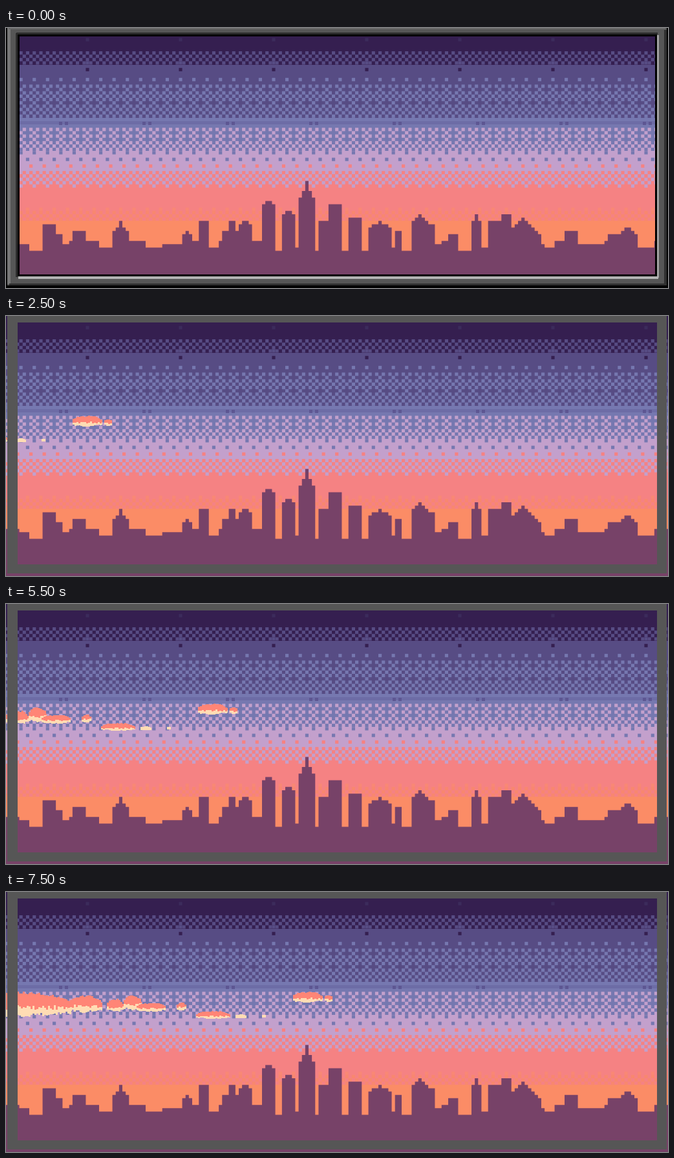
An HTML page with a canvas that plays this animation: 1024 px wide and 402 px high, repeating every 8000 ms.

```html
<!DOCTYPE html>
<html lang="en">
<head>
<meta charset="utf-8">
<title>City at dusk</title>
<style>
  html, body { margin: 0; width: 1024px; height: 402px; overflow: hidden; background: #565656; }
  canvas { display: block; }
</style>
</head>
<body>
<canvas id="stage" width="1024" height="402"></canvas>
<script>
const W = 1024, H = 402, CELL = 36 / 7, COLS = 200;
const NIGHT = '#351f50', DUSK = '#574c84', BLUE = '#7678b0', LILAC = '#c3a0cc';
const SALMON = '#f58283', ORANGE = '#fb8c66', CITY = '#774268';
const CORAL = '#ff8576', CREAM = '#ffdcb4', GREY = '#565656';

const ctx = document.getElementById('stage').getContext('2d');
const backdrop = document.createElement('canvas');
backdrop.width = W;
backdrop.height = H;
const sky = backdrop.getContext('2d');

function seeded(seed) {
  return () => (seed = (seed * 16807) % 2147483647) / 2147483647;
}

function box(g, color, x, y, x2, y2) {
  g.fillStyle = color;
  g.fillRect(x, y, x2 - x, y2 - y);
}

function band(color, row, end) {
  box(sky, color, 0, Math.round(row * CELL), W, Math.round(end * CELL));
}

// One row of single cells, every `gap` columns.
function dots(color, row, gap, first = 0) {
  sky.fillStyle = color;
  for (let c = first; c < COLS; c += gap) sky.fillRect(c * CELL, row * CELL, CELL, CELL);
}

// Checkerboard; rows listed in `sparse` keep every other dot.
function checker(color, row, end, parity, sparse = []) {
  for (let r = row; r < end; r++) {
    dots(color, r, sparse.includes(r) ? 4 : 2, (r + parity) % 2);
  }
}

function paintSky() {
  band(NIGHT, 0, 11);
  band(DUSK, 11, 27);
  band(BLUE, 27, 37);
  band(LILAC, 37, 44);
  band(SALMON, 44, 58);
  band(ORANGE, 58, 79);

  dots('#3c2c5c', 3, 28, 24);
  checker(DUSK, 7, 11, 1);
  dots(DUSK, 10, 28, 24);
  dots(NIGHT, 12, 28, 24);
  dots(BLUE, 15, 4);
  checker(BLUE, 17, 27, 0, [18, 22]);

  band('#6d6ca6', 28, 29);
  for (let x = 82; x < W; x += 129) {
    for (const dx of [0, 9]) box(sky, '#5d5692', x + dx, 145, x + dx + 5, 150);
  }

  checker(LILAC, 30, 37, 1, [31, 33]);
  dots(BLUE, 37, 4);
  dots(BLUE, 39, 4, 2);
  dots(SALMON, 41, 4, 3);
  dots(SALMON, 43, 2, 1);
  checker(LILAC, 44, 48, 1, [47]);

  dots('#f98875', 54, 4, 2);
  checker('#f8876f', 55, 58, 1);
}

// Landmarks in cells: x, width, top row, and how steeply the roof falls from its middle.
const towers = [
  [11, 4, 59], [15, 2, 62], [20, 4, 61], [32, 5, 58, 1.5], [53, 3, 61, 1], [58, 3, 58],
  [65, 5, 61], [67, 2, 58], [70, 4, 57, 1], [77, 4, 52, .6], [83, 4, 54.5, 1],
  [88, 5, 46, 2.5], [94, 7, 58], [97, 4, 53], [103, 4, 57], [109, 7, 58, .6],
  [117, 2, 61], [122, 5, 56, 1], [126, 3, 59], [133, 3, 62], [140, 3, 56, 2],
  [145, 7, 58], [149, 3, 56], [150, 11, 57, 1], [168, 4, 61], [181, 9, 62], [185, 4, 60, .6]
];

function paintCity() {
  const random = seeded(11);
  const roofs = [];
  while (roofs.length < COLS) {
    const top = 64 + Math.floor(random() * 4);
    for (let n = 2 + random() * 4; n > 0; n--) roofs.push(top);
  }
  for (const [x, width, top, slope = 0] of towers) {
    for (let i = 0; i < width; i++) {
      const row = Math.round(top + Math.abs(i - (width - 1) / 2) * slope);
      roofs[x + i] = Math.min(roofs[x + i], row);
    }
  }
  sky.beginPath();
  sky.moveTo(0, H);
  roofs.forEach((row, c) => {
    sky.lineTo(c * CELL, row * CELL);
    sky.lineTo((c + 1) * CELL, row * CELL);
  });
  sky.lineTo(W, H);
  sky.fillStyle = CITY;
  sky.fill();
}

// Puffs as x, width, top, bottom, placed where the drift ends.
const puffs = [
  [442, 46, 154, 172], [491, 12, 159, 171],
  [292, 53, 184, 197], [353, 17, 189, 196], [394, 6, 189, 195],
  [154, 26, 165, 187], [180, 28, 160, 184], [200, 45, 171, 186], [262, 15, 170, 184],
  [-90, 190, 154, 195], [94, 53, 160, 188]
];

// A ragged dome with a lit underside; thin wisps are lit throughout.
function drawPuff([x, width, top, bottom], random) {
  const height = bottom - top, step = 3;
  for (let dx = 0; dx < width; dx += step) {
    const u = Math.abs((dx + step / 2) / width * 2 - 1);
    const left = x + dx, right = Math.min(left + step, x + width);
    const rise = top + height * (.35 * u ** 3 + .1 * random());
    const lit = height < 8 ? rise : top + height * (.5 + .2 * random());
    const end = bottom - height * (.15 * u + .12 * random());
    box(ctx, CORAL, left, Math.round(rise), right, Math.round(end));
    box(ctx, CREAM, left, Math.round(lit), right, Math.round(end));
  }
}

function drawClouds(shift) {
  const random = seeded(5);
  ctx.save();
  ctx.translate(shift, 0);
  for (const puff of puffs) drawPuff(puff, random);
  ctx.restore();
}

function ring(color, x, y, x2, y2, width) {
  ctx.strokeStyle = color;
  ctx.lineWidth = width;
  ctx.strokeRect(x + width / 2, y + width / 2, x2 - x - width, y2 - y - width);
}

function drawFrame() {
  box(ctx, GREY, 2, 0, 18, 398);
  box(ctx, GREY, 1007, 0, 1022, 398);
  box(ctx, GREY, 2, 0, 1022, 10);
  box(ctx, GREY, 2, 384, 1022, 398);
}

function drawBevel() {
  drawFrame();
  box(ctx, '#000', 0, 0, 2, H);
  box(ctx, '#000', 1022, 0, W, H);
  box(ctx, '#000', 0, 398, W, H);
  box(ctx, '#777', 2, 0, 7, 396);
  box(ctx, '#6a6a6a', 4, 0, 1020, 2);
  box(ctx, '#303030', 1018, 3, 1022, 398);
  box(ctx, '#303030', 5, 395, 1020, 398);
  box(ctx, '#2c2c2c', 15, 8, 18, 385);
  box(ctx, '#2c2c2c', 16, 7, 1008, 10);
  box(ctx, '#a2a2a2', 1007, 11, 1010, 386);
  box(ctx, '#b4b4b4', 19, 384, 1009, 388);
  ring('#000', 18, 10, 1007, 384, 3);
}

// Steady drift to the right with a slow surge, relative to the final place.
function drift(step) {
  return Math.round(34 * (step - 15) - 3 + 6 * Math.sin((step - 4) * .66));
}

const STEP = 500, LOOP = 8000;
const start = performance.now();
let shown = -1;

function tick() {
  const step = Math.floor((performance.now() - start) % LOOP / STEP);
  if (step !== shown) {
    shown = step;
    ctx.drawImage(backdrop, 0, 0);
    if (step === 0) {
      drawBevel();
    } else {
      drawClouds(drift(step));
      drawFrame();
    }
  }
  requestAnimationFrame(tick);
}

paintSky();
paintCity();
tick();
</script>
</body>
</html>
```
